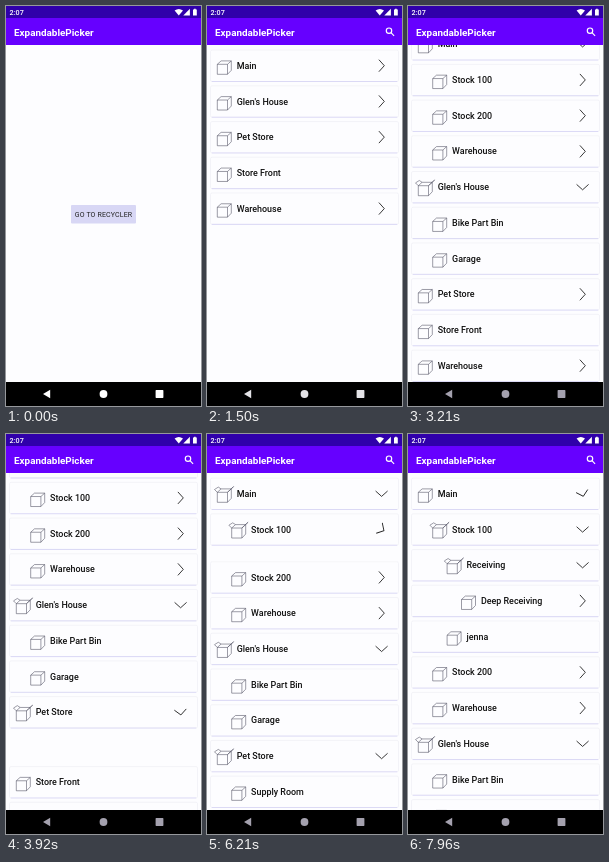
An HTML page for the animation above (8000 ms loop, 195 by 400 pixels).

```html
<!DOCTYPE html>
<html lang="en">
<head>
<meta charset="utf-8">
<title>ExpandablePicker</title>
<style>
  html, body { margin: 0; width: 100%; height: 100%; overflow: hidden; background: #fdfdff; }
  svg { display: block; width: 100vw; height: 100vh; }
  text { font-family: Roboto, "Noto Sans", sans-serif; font-weight: 500; }
  .title { font-weight: 700; }
  .button { font-weight: 400; letter-spacing: .15px; }
</style>
</head>
<body>
<svg id="stage" viewBox="0 0 195 400" preserveAspectRatio="none">
  <defs>
    <clipPath id="listArea"><rect y="39" width="195" height="337"/></clipPath>
    <clipPath id="reveal"><rect id="revealRect" width="195" height="400"/></clipPath>
    <g id="bar">
      <rect width="195" height="39" fill="#6600ff"/>
      <rect width="195" height="12" fill="#3000aa"/>
      <text class="title" x="8" y="29.6" font-size="9.9" fill="#fff">ExpandablePicker</text>
    </g>
  </defs>

  <g id="home">
    <rect width="195" height="400" fill="#fdfdff"/>
    <use href="#bar"/>
    <rect x="65" y="199" width="65" height="18.5" rx="1" fill="#d8d7f5"/>
    <text class="button" x="97.5" y="210.6" font-size="7" text-anchor="middle" fill="#222">GO TO RECYCLER</text>
  </g>

  <g clip-path="url(#reveal)">
    <g id="picker">
      <rect width="195" height="400" fill="#fdfdff"/>
      <g id="list" clip-path="url(#listArea)"></g>
      <use href="#bar"/>
      <g fill="none" stroke="#fff" stroke-width="1.2">
        <circle cx="182" cy="24.7" r="2.7"/>
        <path d="M184 26.7l3.1 3.1"/>
      </g>
    </g>
  </g>

  <g fill="#fff">
    <text x="3.6" y="8.8" font-size="7.2" fill="#fff">2:07</text>
    <path d="M168.6 4.4Q172.8 1.4 177 4.4L172.8 9.4z"/>
    <path d="M183.9 2.8v6.6h-6.6z"/>
    <path d="M187 3.6h1.1v-.8h1.6v.8h1.1v5.9H187z"/>
  </g>

  <rect y="376" width="195" height="24" fill="#000"/>
  <g id="nav">
    <path d="M37 388l7.2-4.2v8.4z"/>
    <circle cx="97.5" cy="388" r="3.9"/>
    <rect x="149.6" y="384.1" width="7.8" height="7.8" rx=".6"/>
  </g>
</svg>

<script>
const LOOP = 8000, PITCH = 35.72, FIRST = 59.7, INDENT = 14.4;
const LAG = 16, MOVE = 250, FADE = 120, TURN = 250;
const NEVER = 1e9, ALWAYS = -1e9;

const $ = id => document.getElementById(id);
const clamp = v => Math.max(0, Math.min(1, v));
const span = (t, start, length) => clamp((t - start) / length);
const easeInOut = p => (1 - Math.cos(Math.PI * p)) / 2;
const easeOut = p => 1 - (1 - p) ** 3;

// Moments at which a row's box opens
const MAIN = 1660, HOUSE = 2666, PET = 3688, DEPOT = 4600, STOCK = 6127, RECEIVING = 7127;

// label, level, expandable, parent's opening, own opening, own closing
const rows = [
  ["Main", 0, true, ALWAYS, MAIN, 7920],
  ["Stock 100", 1, true, MAIN, STOCK],
  ["Receiving", 2, true, STOCK, RECEIVING],
  ["Deep Receiving", 3, true, RECEIVING],
  ["jenna", 2, false, STOCK],
  ["Stock 200", 1, true, MAIN],
  ["Warehouse", 1, true, MAIN],
  ["Glen's House", 0, true, ALWAYS, HOUSE],
  ["Bike Part Bin", 1, false, HOUSE],
  ["Garage", 1, false, HOUSE],
  ["Pet Store", 0, true, ALWAYS, PET],
  ["Supply Room", 1, false, PET],
  ["Store Front", 0, false, ALWAYS],
  ["Warehouse", 0, true, ALWAYS, DEPOT, 4990]
].map(([label, level, expandable, parentOpen, open = NEVER, close = NEVER]) =>
  ({ label, level, expandable, added: parentOpen + LAG, open, close }));

const CRATE = "M0-2h10.2v10H0zM14-5.4V4l-3.8 4";
const CLOSED_BOX = CRATE + "M0-2l3.8-3.4H14L10.2-2";
const OPEN_BOX = CRATE + "M0-2l-2.8-2.8 3.8-2.4 2.8 1.8zM3.8-5.4H14" +
  "M10.2-2l2.6-2.6 3.6-3.2L14-5.4z";

function add(parent, name, attrs) {
  const node = document.createElementNS("http://www.w3.org/2000/svg", name);
  for (const key in attrs) node.setAttribute(key, attrs[key]);
  return parent.appendChild(node);
}

for (const row of rows) {
  const shift = row.level * INDENT;
  row.node = add($("list"), "g", {});
  add(row.node, "rect", { x: 3.5, y: -15.6, width: 188, height: 31.4, rx: 1.5,
    fill: "#fdfdff", stroke: "#ececf4", "stroke-width": .6 });
  add(row.node, "path", { d: "M4.8 15.8H190.2", stroke: "#cbc8f4", "stroke-width": .6 });
  row.box = add(row.node, "path", { transform: `translate(${10.3 + shift} .6)`,
    fill: "none", stroke: "#4a4a5c", "stroke-width": .55, "stroke-linejoin": "round" });
  add(row.node, "text", { x: 29.7 + shift, y: 3.1, "font-size": 8.94, fill: "#111" })
    .textContent = row.label;
  if (row.expandable) row.chevron = add(row.node, "path", { d: "M-2.7-6L2.7 0L-2.7 6",
    fill: "none", stroke: "#222", "stroke-width": .9 });
}

function scrollAt(t) {
  return 31.5 * easeOut(span(t, 3100, 350))
    + 31.8 * easeOut(span(t, 4100, 350))
    - 63.3 * easeInOut(span(t, 5280, 500));
}

function drawRows(t) {
  let y = FIRST - scrollAt(t);
  for (const row of rows) {
    const opened = t >= row.open && t < row.close;
    row.node.setAttribute("transform", `translate(0 ${y.toFixed(2)})`);
    row.node.setAttribute("opacity", span(t, row.added + MOVE, FADE));
    row.box.setAttribute("d", opened ? OPEN_BOX : CLOSED_BOX);
    if (row.chevron) {
      const turn = span(t, row.open, TURN) - span(t, row.close, TURN);
      row.chevron.setAttribute("transform", `translate(174.6 0) rotate(${90 * turn})`);
    }
    y += PITCH * easeInOut(span(t, row.added, MOVE));
  }
}

function drawScreens(t) {
  const p = easeOut(span(t, 680, 400));
  $("home").setAttribute("transform", `translate(0 ${-8 * p})`);
  $("picker").setAttribute("transform", `translate(0 ${16 * (1 - p)})`);
  $("revealRect").setAttribute("y", 400 * (1 - p));
}

function drawNav(t) {
  const p = .3 * span(t, 1000, 500) + .7 * span(t, 1500, 700);
  const mix = end => Math.round(255 + (end - 255) * p);
  $("nav").setAttribute("fill", `rgb(${mix(164)},${mix(161)},${mix(174)})`);
}

function render(t) {
  drawScreens(t);
  drawRows(t);
  drawNav(t);
}

function tick() {
  render(performance.now() % LOOP);
  requestAnimationFrame(tick);
}
tick();
</script>
</body>
</html>
```
